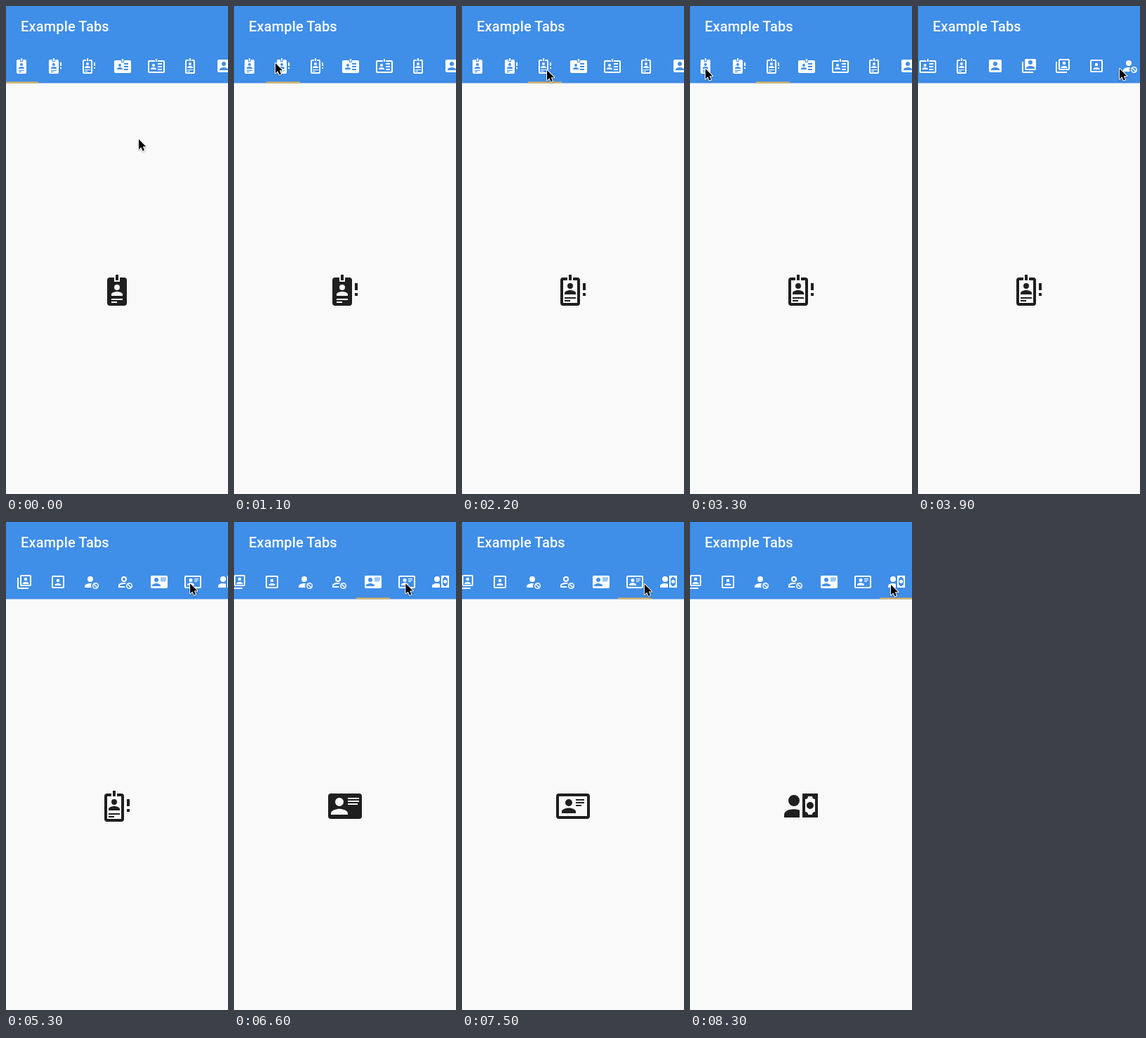
Animation of 316 by 692 pixels, one loop 9 s. Source, as an HTML page:

```html
<!DOCTYPE html>
<html lang="en">
<head>
<meta charset="utf-8">
<title>Example Tabs</title>
<style>
  html, body { margin: 0; width: 100%; height: 100%; overflow: hidden; background: #f9f9f9; }
  svg { display: block; width: 100%; height: 100%; }
  text { font: 500 20px Roboto, sans-serif; letter-spacing: .15px; fill: #fff; }
  #cursor { filter: drop-shadow(0 1px 1px rgba(0, 0, 0, .3)); }
</style>
</head>
<body>
<svg viewBox="0 0 316 692">
  <rect width="316" height="692" fill="#f9f9f9"/>
  <g fill="#1f1f1f" fill-rule="evenodd">
    <path id="oldPage"/>
    <path id="newPage"/>
  </g>
  <rect width="316" height="109.4" fill="#3f8ee8"/>
  <text x="21" y="36">Example Tabs</text>
  <g id="tabs" fill="#fff" fill-rule="evenodd"></g>
  <rect id="ink" y="107.4" width="48" height="2" fill="#e6b04f"/>
  <path id="cursor" d="M0 0V14.4L3.3 11.3 5.7 16.6 8 15.6 5.7 10.3H10.2Z"
        stroke="#fff" stroke-width="2" stroke-linejoin="round" paint-order="stroke"/>
</svg>
<script>
const LOOP = 9000, STEP = 100, SLIDE = 270, WIDTH = 316, TAB = 48;
const $ = id => document.getElementById(id);

// Path helpers on a 24-unit icon grid; overlaps cut holes (even-odd).
const box = (x, y, w, h) => `M${x} ${y}h${w}v${h}h${-w}z`;
const disc = (x, y, r) => `M${x - r} ${y}a${r} ${r} 0 1 0 ${2 * r} 0a${r} ${r} 0 1 0 ${-2 * r} 0z`;
const card = (x, y, w, h) =>
  `M${x + 2} ${y}h${w - 4}a2 2 0 0 1 2 2v${h - 4}a2 2 0 0 1-2 2h${4 - w}a2 2 0 0 1-2-2v${4 - h}a2 2 0 0 1 2-2z`;
const frame = (x, y, w, h) => card(x, y, w, h) + box(x + 2, y + 2, w - 4, h - 4);
const lines = (x, y, gap, ...widths) => widths.map((w, i) => box(x, y + i * gap, w, gap / 2)).join("");

// Head of radius r; shoulders run from top to side to base, measured from the head's centre.
function bust(x, y, r, top, side, base) {
  const d = side - top, w = 2 * r;
  return disc(x, y, r) + `M${x - w} ${y + base}V${y + side}` +
    `c0 ${-.66 * d} ${.67 * w} ${-d} ${w} ${-d}s${w} ${.34 * d} ${w} ${d}V${y + base}z`;
}
const small = (x, y) => bust(x, y, 2, 3, 5, 6);
const medium = (x, y) => bust(x, y, 2.25, 4, 6.25, 7);
const large = (x, y) => bust(x, y, 3, 4.9, 8, 9);

// A card with a clip at the top
function holder(x, y, w, h, open) {
  const mid = x + w / 2;
  return (open ? frame : card)(x, y, w, h) +
    box(mid - 2, y, 4, open ? 2 : 3) + box(mid - 1, y - 2, 2, 4);
}
function badge(x, open) {
  const y = open ? 9 : 10;
  return holder(x, 3, 14, 20, open) + small(x + 7, y) + lines(x + 3, y + 8, 2, 8, 4);
}
const alertBadge = open => badge(3, open) + box(19, 7, 2, 5) + box(19, 14, 2, 2);
const wideBadge = open => holder(0, 4, 24, 18, open) + small(8, 11) + lines(14, 8, 4, 6, 6, 6);
const behind = "M4 6H2V20A2 2 0 0 0 4 22H18V20H4z";
const ban = disc(17.5, 17.5, 4.5) + disc(17.5, 17.5, 3) + "M14.9 16l1.1-1.1 4.1 4.1-1.1 1.1z";

const icons = [
  badge(5, false),
  alertBadge(false),
  alertBadge(true),
  wideBadge(false),
  wideBadge(true),
  badge(5, true),
  card(3, 3, 18, 18) + large(12, 9),
  behind + card(6, 2, 16, 16) + large(14, 7),
  behind + frame(6, 2, 16, 16) + medium(14, 8),
  frame(3, 3, 18, 18) + medium(12, 10),
  ban + disc(10, 8, 4) + "M12 14.1C7 13.5 2 15.5 2 18V20H11.5Q10.2 17 12 14.1z",
  ban + disc(10, 8, 4) + disc(10, 8, 2) +
    "M12.9 13.3C8 12.3 2 14 2 17V20H11.5L11 18.1H3.9V17C3.9 16 8 14.5 11.5 15z",
  card(0, 3, 24, 18) + large(8, 9) + lines(14, 6, 2, 8, 8, 7),
  frame(0, 3, 24, 18) + bust(9, 9.5, 2.5, 3.75, 6.25, 7.5) + lines(14, 7, 2, 6, 6, 4),
  disc(7, 8, 4) + "M11 14.7V20H0V18C0 15 5 13 11 14.7z" + box(13, 3, 11, 17) +
    disc(18.5, 11.5, 2.5) + "M22 7a2 2 0 0 1-2-2h-3a2 2 0 0 1-2 2v9a2 2 0 0 1 2 2h3a2 2 0 0 1 2-2z"
];
$("tabs").innerHTML = icons.map((d, i) =>
  `<path transform="translate(${10 + TAB * i} 73)" d="${d}"/>`).join("");

// Each move: start, end, then the values it arrives at.
const tap = (start, tab) => [start, start + SLIDE, tab];
const picks = [tap(837, 1), tap(1942, 2), tap(5730, 12), tap(6900, 13), tap(7850, 14)];
const scrolls = [[3500, 3800, 200], [4600, 4800, 380], [5730, 6000, 400]];
const pointer = [
  [0, 600, 59, 81], [1300, 1700, 121, 91],
  [2200, 2600, 185, 36], [2600, 3000, 287, 89],
  [3000, 3300, 22, 89], [3500, 3800, 287, 89], [3900, 4200, 75, 82],
  [4900, 5000, 287, 90], [5220, 5600, 209, 81],
  [6450, 6700, 249, 88], [7450, 7700, 286, 89]
];

const mix = (a, b, p) => a + (b - a) * p;

// cubic-bezier(.25, .1, .25, 1)
function ease(p) {
  if (p >= 1) return 1;
  let lo = 0, hi = 1;
  for (let i = 0; i < 20; i++) {
    const s = (lo + hi) / 2;
    if (.75 * s * (1 - s) + s ** 3 < p) lo = s; else hi = s;
  }
  return .3 * lo * (1 - lo) ** 2 + 3 * (1 - lo) * lo * lo + lo ** 3;
}

function follow(moves, t, ...rest) {
  let from = rest, to = rest, p = 1;
  for (const [start, end, ...goal] of moves) {
    if (t < start) break;
    from = to;
    to = goal;
    p = ease((t - start) / (end - start));
  }
  return { from, to, p, at: to.map((v, i) => mix(from[i], v, p)) };
}

const place = (id, x, y, more = "") => $(id).setAttribute("transform", `translate(${x} ${y})${more}`);

function page(id, [tab], shift) {
  $(id).setAttribute("d", icons[tab]);
  place(id, 134 + Math.round(WIDTH * shift), 379, "scale(2)");
}

function draw(t) {
  const pick = follow(picks, t, 0);
  const [scroll] = follow(scrolls, t, 0).at;
  page("oldPage", pick.from, -pick.p);
  page("newPage", pick.to, 1 - pick.p);
  place("tabs", -scroll, 0);
  place("ink", pick.at[0] * TAB - 2 - scroll, 0);
  place("cursor", ...follow(pointer, t, 189, 189).at);
}

// The screen refreshes ten times a second.
function tick() {
  draw(Math.floor(performance.now() % LOOP / STEP) * STEP);
  requestAnimationFrame(tick);
}
tick();
</script>
</body>
</html>
```
